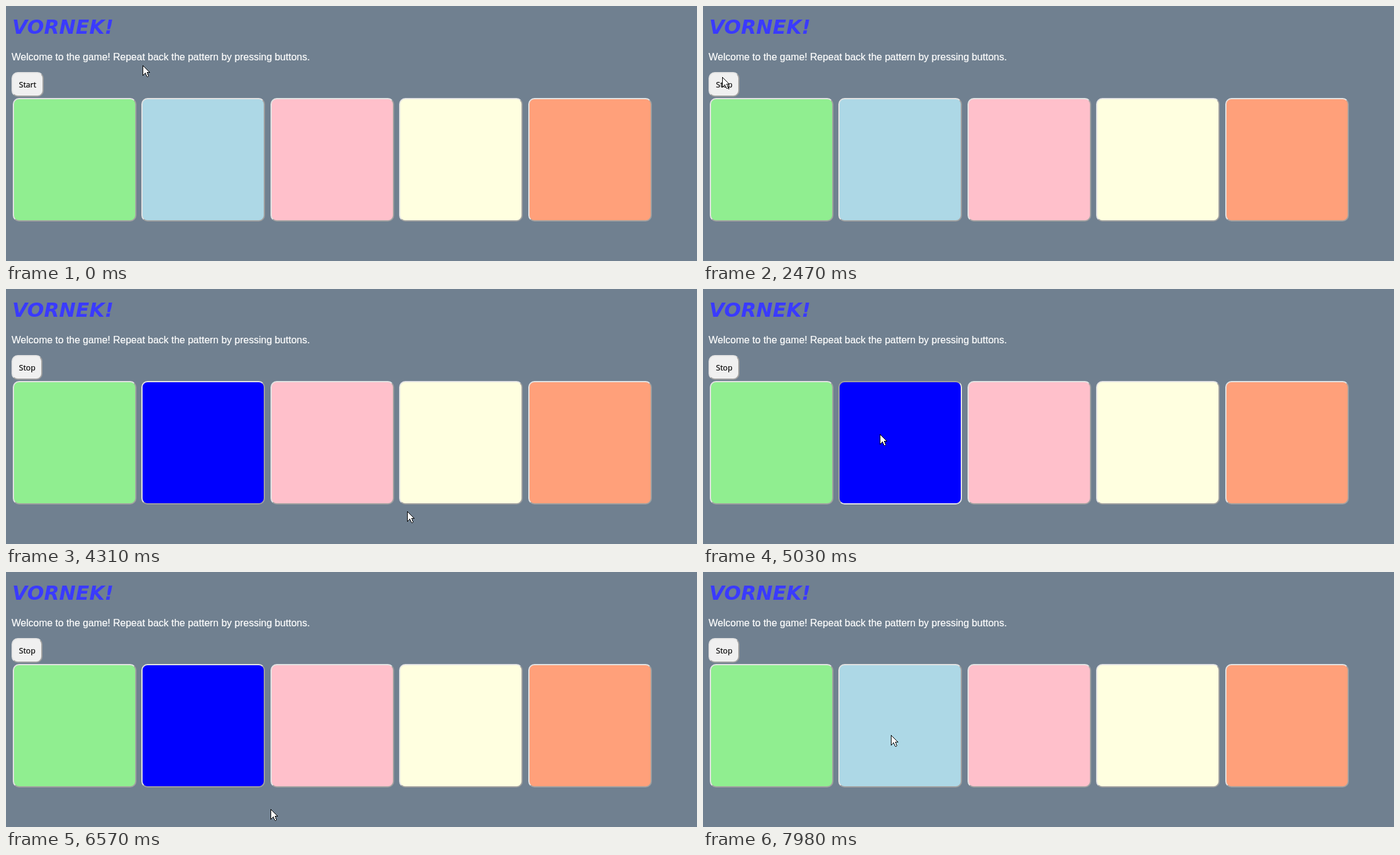
Recreate the animation shown at these times as an HTML page. Size 1118 by 413 pixels, loop 8 s.

```html
<!DOCTYPE html>
<html lang="en">
<head>
<meta charset="utf-8">
<title>Pattern game</title>
<style>
  html, body { margin: 0; width: 100%; height: 100%; overflow: hidden; background: #708090; }
  .btn {
    position: absolute; box-sizing: border-box;
    border: 2px solid; border-color: #e3e3e3 #a0a0a0 #a0a0a0 #e3e3e3; border-radius: 10px;
  }
  .pad { top: 149px; width: 200px; height: 200px; }
  .lit { background: #00f !important; }
  .down { border-color: #a0a0a0 #e3e3e3 #e3e3e3 #a0a0a0; }
  #toggle { left: 9px; top: 107px; height: 40px; background: #f0f0f0; }
  svg { position: absolute; left: 0; top: 0; }
  .title { font: italic bold 32px "DejaVu Sans", sans-serif; fill: #3a3aff; }
  .intro { font: 16px "Liberation Sans", Arial, sans-serif; fill: #fff; stroke: #fff; stroke-width: .2; }
  .label { font: 12.6px "Open Sans", sans-serif; fill: #000; stroke: #000; stroke-width: .2; }
  #cursor { fill: #fff; stroke: #000; shape-rendering: crispEdges; }
</style>
</head>
<body>
<div class="btn" id="toggle"></div>
<svg width="1118" height="413" viewBox="0 0 1118 413">
  <text class="title" x="10" y="45">VORNEK!</text>
  <text class="intro" x="9" y="88">Welcome to the game! Repeat back the pattern by pressing buttons.</text>
  <text class="label" id="label" x="21" y="132">Start</text>
  <path id="cursor" d="M.5 .5V16.5L4.5 12.5L6.5 17.5L7.5 18.5H8.5L9.5 17.5L7.5 11.5H11.5Z"/>
</svg>
<script>
const LOOP = 8000, TICK = 60, HOLD = 810;
const $ = id => document.getElementById(id);
const toggle = $('toggle'), label = $('label'), cursor = $('cursor');

const pads = ['lightgreen', 'lightblue', 'pink', 'lightyellow', 'lightsalmon'].map((color, i) => {
  const pad = document.createElement('div');
  pad.className = 'btn pad';
  pad.style.background = color;
  pad.style.left = Math.round(11 + 208.445 * i) + 'px';
  document.body.insertBefore(pad, toggle);
  return pad;
});
const blue = pads[1];

// Pointer moves; lift bows the path upwards
const home = { x: 221, y: 96 };
const moves = [
  { start: 1440, end: 2050, x: 31, y: 115, lift: 63 },
  { start: 3350, end: 3750, x: 682, y: 397, lift: 105 },
  { start: 4310, end: 4660, x: 286, y: 235, lift: 89 },
  { start: 5090, end: 5130, x: 291, y: 235, lift: 0 },
  { start: 5720, end: 5900, x: 513, y: 381, lift: 0 },
  { start: 6390, end: 6990, x: 249, y: 270, lift: -46 },
  { start: 7680, end: 7980, x: 304, y: 264, lift: 0 }
];
const flashes = [4310, 6080, 7170];

const ease = p => .33 * p + .67 * p * p * (3 - 2 * p);
const mix = (a, b, u) => a + (b - a) * u;

function pointer(t) {
  const i = moves.findLastIndex(m => t >= m.start);
  if (i < 0) return home;
  const to = moves[i], from = moves[i - 1] || home;
  if (t >= to.end) return to;
  // The pointer is redrawn once per tick, first at the start of a move
  const gaps = Math.round((to.end - to.start) / TICK);
  const step = Math.floor((t - to.start) / (to.end - to.start) * gaps) + 1;
  const u = ease(step / (gaps + 1));
  return {
    x: Math.round(mix(from.x, to.x, u)),
    y: Math.round(mix(from.y, to.y, u) - to.lift * Math.sin(Math.PI * u))
  };
}

function draw(now) {
  const t = now % LOOP;
  const playing = t >= 2470;
  const { x, y } = pointer(t);
  label.textContent = playing ? 'Stop' : 'Start';
  toggle.style.width = (playing ? 50 : 52) + 'px';
  blue.classList.toggle('lit', flashes.some(on => t >= on && t < on + HOLD));
  blue.classList.toggle('down', t >= 5030 && t < 5090);
  cursor.setAttribute('transform', `translate(${x} ${y})`);
  requestAnimationFrame(draw);
}
draw(performance.now());
</script>
</body>
</html>
```
